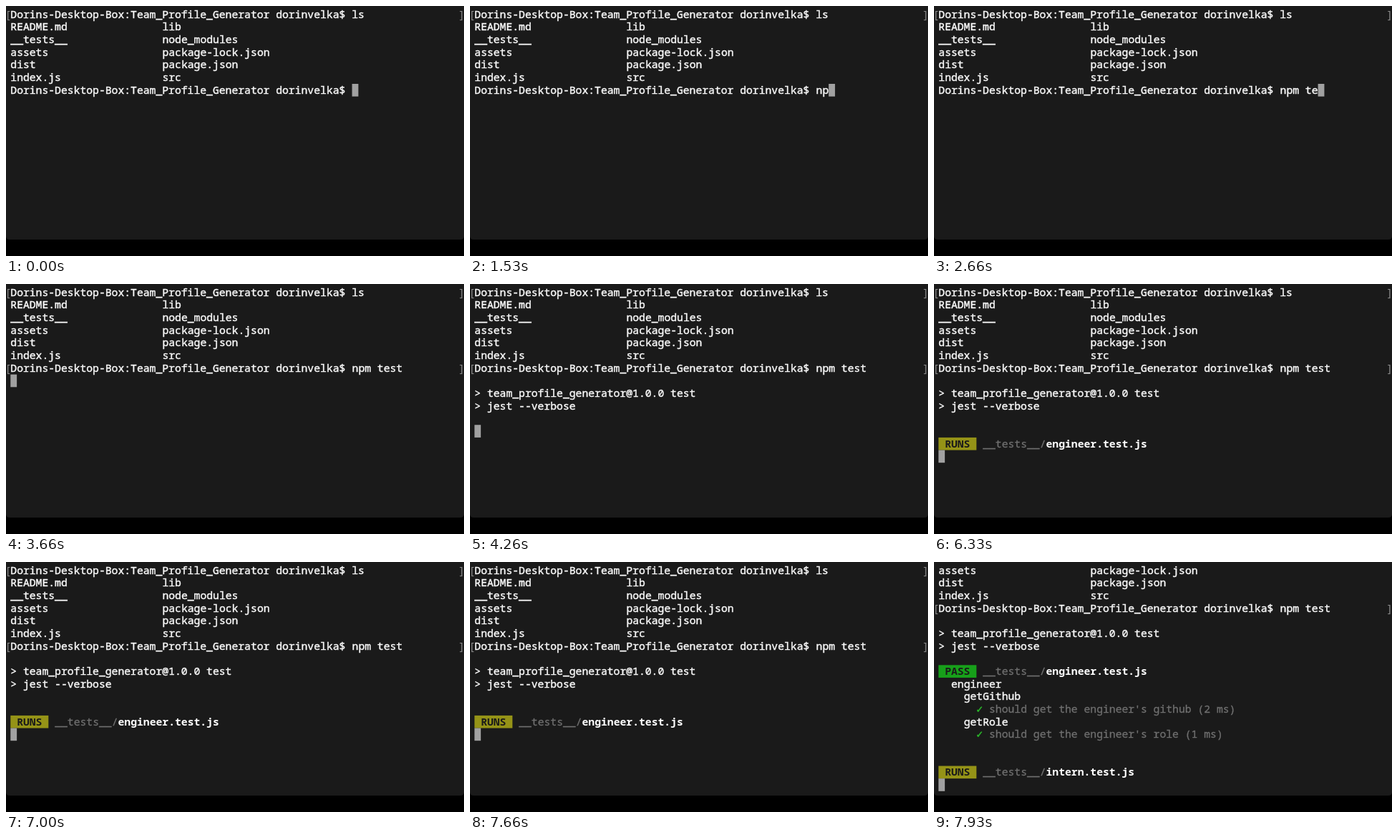
Recreate the animation shown at these times as an HTML page. Size 640x350 px, loop 8000 ms.

```html
<!DOCTYPE html>
<html lang="en">
<head>
<meta charset="utf-8">
<title>Terminal test run</title>
<style>
  html, body { margin: 0; width: 100%; height: 100%; overflow: hidden; background: #000; }
  svg { display: block; width: 640px; height: 350px; }
  /* a hairline stroke gives the medium weight */
  text {
    font: 14.73px "Noto Sans Mono", "DejaVu Sans Mono", monospace;
    font-variant-ligatures: none;
    color: #f8f8f8;
    fill: currentColor;
    stroke: currentColor;
    stroke-width: .45px;
    white-space: pre;
  }
  .bold, .wait, .tag { font-weight: 700; stroke: none; }
  .bold { color: #fff; }
  .wait { color: #777; }
  .tag { color: #1a1a1a; }
  .dim { color: #707070; stroke-width: .3px; }
  .ok { color: #2bbf2b; }
  .mark { color: #8c8c8c; stroke: none; }
</style>
</head>
<body>
<svg id="stage" viewBox="0 0 640 350">
  <path d="M0 0H640V322Q640 327 635 327H5Q0 327 0 322Z" fill="#1a1a1a"/>
</svg>
<script>
const LOOP = 8000, LEFT = 6.3, TOP = 3.1, COL = 8.838, ROW = 17.65, BASE = 13.6;
const stage = document.getElementById('stage');

function add(parent, tag, attrs = {}) {
  const el = document.createElementNS('http://www.w3.org/2000/svg', tag);
  for (const key in attrs) el.setAttribute(key, attrs[key]);
  return parent.appendChild(el);
}

const group = parent => add(parent, 'g');
const colX = col => LEFT + col * COL;
const rowY = row => TOP + row * ROW;

function write(parent, row, col, str, cls = '') {
  const el = add(parent, 'text', { x: colX(col), y: rowY(row) + BASE, class: cls });
  el.textContent = str;
  return el;
}

function block(parent, row, col, cols, fill) {
  return add(parent, 'rect', {
    x: colX(col), y: rowY(row), width: cols * COL, height: ROW, fill
  });
}

function brackets(parent, row) {
  write(parent, row, 0, '[', 'mark').setAttribute('x', -1.5);
  write(parent, row, 0, ']', 'mark').setAttribute('x', 632.2);
}

function suite(parent, row, label, fill, file) {
  block(parent, row, 0, 6, fill);
  write(parent, row, 1, label, 'tag');
  write(parent, row, 7, '__tests__/', 'dim');
  write(parent, row, 17, file, 'bold');
}

function passed(parent, row, name, detail) {
  write(parent, row, 4, name);
  write(parent, row + 1, 6, '✓', 'ok');
  write(parent, row + 1, 8, detail, 'dim');
}

const PROMPT = 'Dorins-Desktop-Box:Team_Profile_Generator dorinvelka$ ';
const COMMAND = 'npm test';
const OLIVE = '#959317', GREEN = '#17a01a';

const history = group(stage);
const scrolledOff = group(history);
brackets(scrolledOff, 0);
write(scrolledOff, 0, 0, PROMPT + 'ls');
[['README.md', 'lib'], ['__tests__', 'node_modules'], ['assets', 'package-lock.json'],
 ['dist', 'package.json'], ['index.js', 'src']].forEach(([a, b], i) => {
  const parent = i < 2 ? scrolledOff : history;
  write(parent, i + 1, 0, a);
  write(parent, i + 1, 24, b);
});
write(history, 6, 0, PROMPT);
const typed = write(history, 6, PROMPT.length, '');

const entered = group(history);
brackets(entered, 6);

const script = group(history);
write(script, 8, 0, '> team_profile_generator@1.0.0 test');
write(script, 9, 0, '> jest --verbose');

const waiting = group(stage);
write(waiting, 11, 0, 'Determining test suites to run...', 'wait');

const running = group(stage);
suite(running, 12, 'RUNS', OLIVE, 'engineer.test.js');

const results = group(stage);
suite(results, 8, 'PASS', GREEN, 'engineer.test.js');
write(results, 9, 2, 'engineer');
passed(results, 10, 'getGithub', "should get the engineer's github (2 ms)");
passed(results, 12, 'getRole', "should get the engineer's role (1 ms)");
suite(results, 16, 'RUNS', OLIVE, 'intern.test.js');

const cursor = block(stage, 6, 0, 1, '#a1a1a1');

const KEYS = [1060, 1530, 1800, 1930, 2400, 2660, 2930, 3130];
const ENTER = 3660, SCRIPT = 4260, WAIT = 5400, RUN = 5460, PASS = 7860;
// time, cursor row, cursor column
const MOVES = [
  ...[0, ...KEYS].map((t, i) => [t, 6, PROMPT.length + i]),
  [ENTER, 7, 0], [SCRIPT, 11, 0], [WAIT, 11, 33], [RUN, 13, 0], [PASS, 17, 0]
];

const show = (el, on) => el.setAttribute('visibility', on ? 'visible' : 'hidden');

function draw(t) {
  typed.textContent = COMMAND.slice(0, KEYS.filter(k => k <= t).length);
  show(entered, t >= ENTER);
  show(script, t >= SCRIPT);
  show(waiting, t >= WAIT && t < RUN);
  show(running, t >= RUN && t < PASS);
  show(results, t >= PASS);
  show(scrolledOff, t < PASS);
  history.setAttribute('transform', `translate(0 ${t >= PASS ? -3 * ROW : 0})`);
  const [, row, col] = MOVES.filter(m => m[0] <= t).pop();
  cursor.setAttribute('x', colX(col));
  cursor.setAttribute('y', rowY(row));
}

const start = performance.now();
function tick() {
  draw((performance.now() - start) % LOOP);
  requestAnimationFrame(tick);
}
tick();
</script>
</body>
</html>
```
